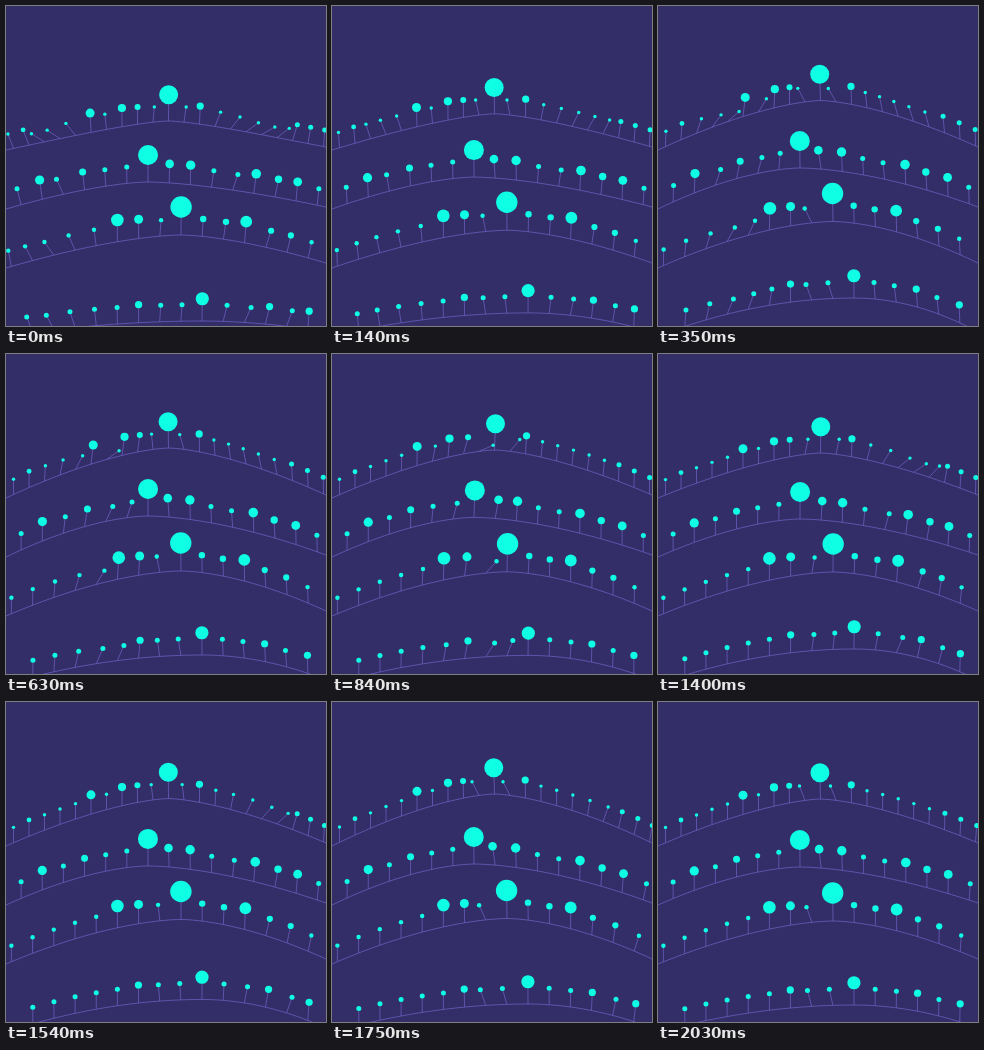
These frames come from a looping animation (320 by 320 pixels, 2100 ms). An HTML page with a canvas:

```html
<!DOCTYPE html>
<html lang="en">
<head>
<meta charset="utf-8">
<title>Swaying dots</title>
<style>
  html, body { margin: 0; width: 100%; height: 100%; overflow: hidden; background: #332e67; }
  canvas { display: block; width: 320px; height: 320px; }
</style>
</head>
<body>
<canvas id="stage"></canvas>
<script>
const SIZE = 320, STEP = 70, LOOP = 2100;
const TIMES = [0, 350, 630, 1120, 1400, 1750, 2030];

// A rope falls from its peak by `drop` (left, right) along a power curve;
// `apex` is the peak height at each of TIMES. `small` is the usual dot
// radius and `big` holds the exceptions, by stem index.
const ROWS = [
  {
    peak: 162.5, gap: 15.5, mid: 10, drop: [47, 44], bend: 1.5, rest: 97,
    apex: [115, 94.5, 94, 99, 99, 92, 97], small: 1.7,
    big: { 1: 2.4, 5: 4.5, 7: 4.1, 8: 3, 10: 9.5, 12: 3.6, 18: 2.5, 19: 2.5, 20: 2.5 }
  },
  {
    peak: 142, gap: 21.15, mid: 7, drop: [38, 36], bend: 1.65, rest: 165,
    apex: [176, 162, 162, 165.5, 165, 162, 165], small: 2.5,
    big: { 2: 4.6, 4: 3.5, 7: 10, 8: 4.3, 9: 4.7, 12: 4.8, 13: 3.7, 14: 4.4 }
  },
  {
    peak: 175, gap: 21.2, mid: 8, drop: [43, 38], bend: 1.65, rest: 219,
    apex: [229, 215.5, 217, 219, 218, 216.5, 219], small: 2.2,
    big: { 5: 6.3, 6: 4.5, 8: 10.7, 9: 3.2, 10: 3.2, 11: 5.9, 12: 3.1, 13: 3.1 }
  },
  {
    peak: 196, gap: 21.15, mid: 8, drop: [27, 23], bend: 1.95, rest: 303,
    apex: [315, 292, 301, 302, 295, 302, 303], small: 2.5,
    big: { 5: 3.6, 8: 6.6, 11: 3.6, 13: 3.6 }
  }
];

// A gust crosses the stage from left to right, fading at the end.
const GUST_X = [45, 75, 100, 222, 252, 295, 330];
const GUST_ANGLE = [-60, 50, 55, 60, 60, 30, 10];

const canvas = document.getElementById('stage');
const ctx = canvas.getContext('2d');
const ratio = window.devicePixelRatio || 1;
canvas.width = canvas.height = SIZE * ratio;
ctx.scale(ratio, ratio);

const bell = (x, centre, width) => Math.exp(-(((x - centre) / width) ** 2) / 2);
const wave = (t, period) => Math.cos(t / period * 2 * Math.PI);

// Eased value at time t between key values.
function at(values, t) {
  let k = 0;
  while (k < TIMES.length - 2 && t >= TIMES[k + 1]) k++;
  const p = (t - TIMES[k]) / (TIMES[k + 1] - TIMES[k]);
  return values[k] + (values[k + 1] - values[k]) * p * p * (3 - 2 * p);
}

// The ends stay put while the middle of the rope bounces.
function ropeY(row, x, t) {
  const left = x < row.peak;
  const q = left ? 1 - x / row.peak : (x - row.peak) / (SIZE - row.peak);
  const bounce = at(row.apex, t) - row.rest;
  return row.rest + row.drop[left ? 0 : 1] * q ** row.bend + bounce * (1 - q * q);
}

// Stem angle in radians; heavier dots lean less.
function lean(x, r, t) {
  const gust = at(GUST_ANGLE, t) * bell(x, at(GUST_X, t), 26);
  const swing = -55 * wave(t - 400, 1450) * bell(x, 162.5, 14);
  const settle = 60 * Math.exp(-t / 500) * wave(t, 1000) * bell(x, 255, 32);
  return (gust + swing + settle) * (1.7 / r) ** 2 * Math.PI / 180;
}

function drawRow(row, t) {
  const dots = [];
  ctx.beginPath();
  for (let x = 0; x <= SIZE; x += 5) ctx.lineTo(x, ropeY(row, x, t));

  let x = row.peak - row.mid * row.gap;
  for (let i = 0; x < SIZE + 6; i++, x += row.gap) {
    const r = row.big[i] || row.small;
    const y = ropeY(row, x, t);
    const angle = lean(x, r, t);
    const length = 13 + 1.4 * r;
    const dot = { x: x + length * Math.sin(angle), y: y - length * Math.cos(angle), r };
    ctx.moveTo(x, y);
    ctx.lineTo(dot.x, dot.y);
    dots.push(dot);
  }
  ctx.stroke();

  for (const dot of dots) {
    ctx.beginPath();
    ctx.arc(dot.x, dot.y, dot.r, 0, Math.PI * 2);
    ctx.fill();
  }
}

function draw() {
  const t = Math.floor(performance.now() % LOOP / STEP) * STEP;
  ctx.fillStyle = '#332e67';
  ctx.fillRect(0, 0, SIZE, SIZE);
  ctx.fillStyle = '#0fffe5';
  ctx.strokeStyle = '#6a5cbc';
  ctx.lineWidth = 0.8;
  for (const row of ROWS) drawRow(row, t);
  requestAnimationFrame(draw);
}
draw();
</script>
</body>
</html>
```
